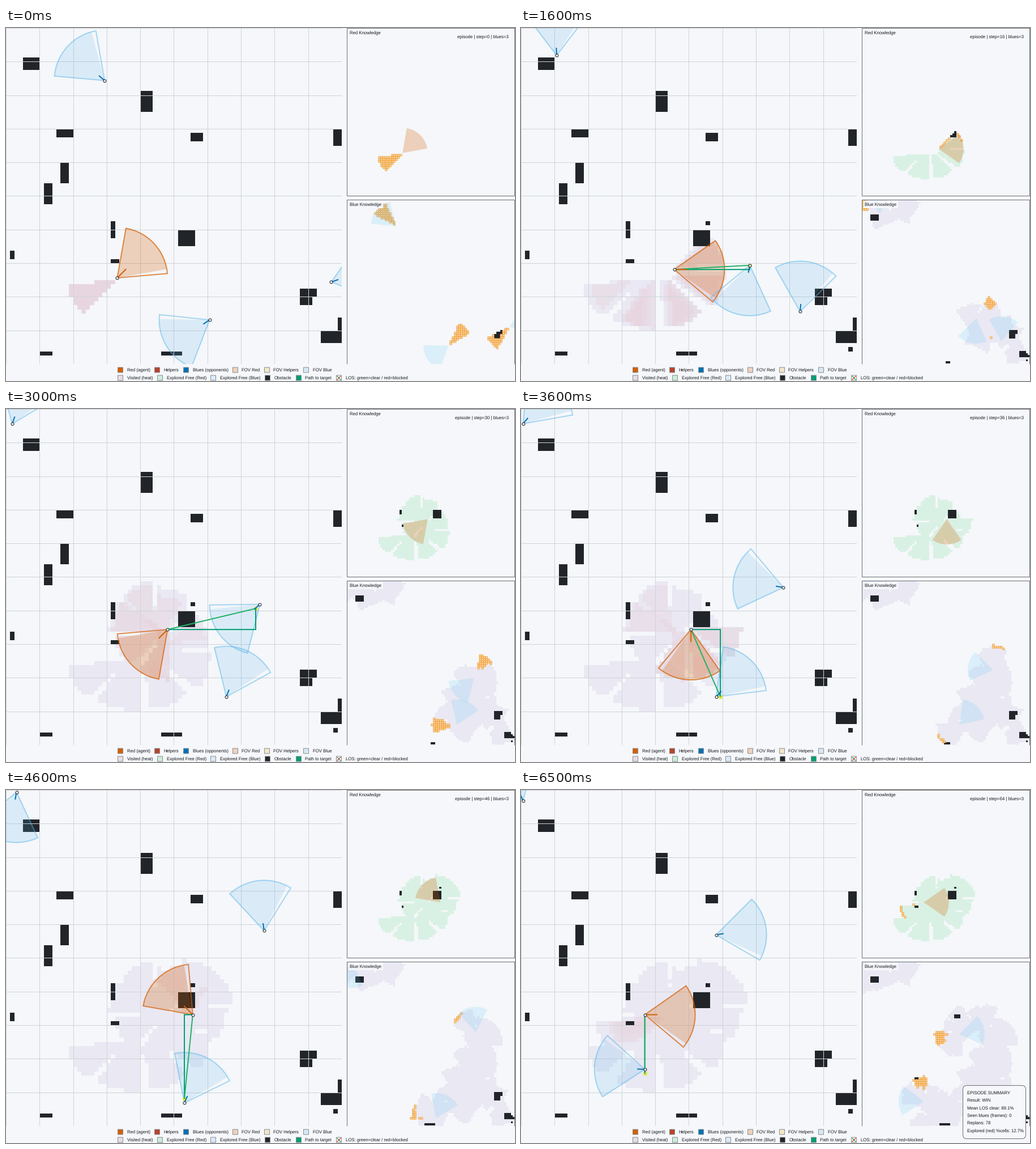
These frames come from a looping animation (899 by 623 pixels, 6600 ms). A matplotlib script:

```python
import numpy as np
import matplotlib.pyplot as plt
from matplotlib.animation import FuncAnimation
from matplotlib.patches import FancyBboxPatch, Polygon, Rectangle

W, H, DPI = 899, 623, 64
PX = 72 / DPI
SIDE = 593
MINI = SIDE / 2
N, LAST, FRAMES = 80, 64, 66
REACH, HALF, SWAY = 12, 35, 60
BG, DARK, GRAY, ORANGE = "#f5f7fa", "#212529", "#6c6f75", "#f59a23"
RED, BLUE, SKY, AQUA = "#d55e00", "#0072b2", "#56b4e9", "#50c8f5"
PATH, SIGHT = "#009e73", "#22b266"
LAVENDER = np.array([233, 232, 243]) / 255
PINK = np.array([231, 214, 224]) / 255
GREEN = np.array([217, 241, 228]) / 255
INK = np.array([33, 37, 41]) / 255

plt.rcParams.update({"font.family": "Liberation Sans", "path.snap": False,
                     "font.size": 7.7 * PX, "text.hinting": "none"})

steps = np.arange(LAST + 1)
rows, cols = np.mgrid[:N, :N]

# column, row, width, height in cells; the last two appear after the first step
BLOCKS = [(4, 7, 4, 3), (32, 15, 3, 5), (12, 24, 4, 2), (44, 25, 3, 2),
          (78, 24, 2, 4), (13, 32, 2, 5), (9, 37, 2, 5), (25, 46, 1, 4),
          (41, 48, 4, 4), (1, 53, 1, 2), (25, 55, 2, 1), (70, 62, 4, 2),
          (70, 64, 3, 2), (79, 69, 1, 3), (75, 72, 5, 3), (8, 77, 3, 1),
          (37, 77, 5, 1), (44, 46, 1, 1), (78, 76, 1, 1)]


def fill_blocks(blocks):
    mask = np.zeros((N, N), bool)
    for c, r, w, h in blocks:
        mask[r:r + h, c:c + w] = True
    return mask


solid, solid_first = fill_blocks(BLOCKS), fill_blocks(BLOCKS[:-2])


def snap(angle):
    return np.rint(angle / 45) * 45


def make_unit(times, keys):
    """Glide between (column, row, heading) keys."""
    c, r, look = [np.interp(steps, times, v) for v in zip(*keys)]
    return dict(pos=np.rint(np.stack([c, r], 1)), look=look)


def scan_ahead(times, keys):
    """Travel direction of each leg, swaying once from side to side."""
    xy = np.array(keys)[:, :2]
    dx, dy = np.diff(xy, axis=0).T
    heading = np.degrees(np.arctan2(dy, dx))
    leg = np.clip(np.searchsorted(times, steps, "right") - 1, 0, len(dx) - 1)
    t = np.array(times)
    u = (steps - t[leg]) / (t[leg + 1] - t[leg])
    return heading[leg] + SWAY * np.sin(2 * np.pi * u)


def make_blue(*keys):
    times = [0, 9, 23, 36, 46, 55, 64]
    return dict(make_unit(times, keys), scan=scan_ahead(times, keys))


red = make_unit([0, 13, 23, 36, 46, 55, 64],
                [(26, 59, -45), (36, 59, 60), (36, 52, -135), (40, 52, -270),
                 (44, 53, -495), (37, 53, -405), (29, 53, -360)])
red["look"] = snap(red["look"])
u = np.minimum(steps / 55, 1)
red["scan"] = snap(135 - 360 * (u + u * u * (3 - 2 * u)))

blues = [
    make_blue((23, 12, 220), (14, 7, 270), (2, 4, 265), (0, 3, 310),
              (2, 0, 460), (0, 3, 580), (0, 2, 605)),
    make_blue((48, 69, 146), (52, 60, 121), (57, 51, 80), (62, 42, 190),
              (61, 33, 262), (54, 30, 190), (46, 34, 350)),
    make_blue((77, 60, 340), (73, 67, 285), (59, 67, 266), (46, 68, 313),
              (42, 74, 294), (33, 74, 314), (29, 66, 182))]
units = [red] + blues


def fan(unit, s, start, width):
    """Cells within reach, clockwise from a start angle."""
    c, r = unit["pos"][s]
    dx, dy = cols - c, rows - r
    dist = np.hypot(dx, dy)
    turn = (np.degrees(np.arctan2(dy, dx)) - start + 1e-6) % 360
    return (dist > 0) & (dist <= REACH) & (turn <= width + 1e-3)


def rgba(mask, color, blocks):
    img = np.zeros((N, N, 4))
    img[..., :3] = color
    img[..., 3] = mask | blocks
    img[blocks, :3] = INK
    return img


def heat_image(heat, blocks):
    share = heat / heat.max()
    mix = ((share > 0.4) * share)[..., None]
    return rgba(heat > 0.045, LAVENDER * (1 - mix) + PINK * mix, blocks)


def explore(team, color):
    """Known-map image and newly found cells for every step."""
    seen = np.zeros((N, N), bool)
    walls = np.zeros((N, N), bool)
    out = []
    for s in steps:
        before = seen
        for m in team:
            seen = seen | fan(m, s, m["scan"][s], HALF)
            if s:
                view = fan(m, s - 1, m["look"][s - 1] - HALF, 2 * HALF)
                walls = walls | view & solid
        r, c = np.nonzero(seen & ~before & ~solid)
        out.append((rgba(seen, color, solid & (walls | seen)),
                    np.stack([c, r], 1) + 0.5))
    return out


def visits():
    heat = np.zeros((N, N))
    out = []
    for s in steps:
        heat = heat * 0.95 + fan(red, s, red["scan"][s], HALF)
        out.append(heat_image(heat, solid if s else solid_first))
    return out


heat_maps = visits()
red_maps, blue_maps = explore([red], GREEN), explore(blues, LAVENDER)

fig = plt.figure(figsize=(W / DPI, H / DPI), dpi=DPI, facecolor=BG)


def pane(x, y, w, h, xmax, ymax):
    ax = fig.add_axes([x / W, 1 - (y + h) / H, w / W, h / H])
    ax.set(xlim=(0, xmax), ylim=(ymax, 0))
    ax.axis("off")
    return ax


def layer(ax):
    lims = ax.get_xlim(), ax.get_ylim()
    img = ax.imshow(np.zeros((N, N, 4)), extent=(0, N, N, 0), aspect="auto",
                    interpolation="nearest", zorder=1)
    ax.set(xlim=lims[0], ylim=lims[1])
    return img


def sector(unit, s, extra=0):
    c, r = unit["pos"][s] + 0.5
    a = np.radians(unit["look"][s] + np.arange(-HALF, HALF + extra + 1, 5))
    return np.stack([np.r_[c, c + REACH * np.cos(a)],
                     np.r_[r, r + REACH * np.sin(a)]], 1)


def wedge(ax, color, alpha, line=False):
    style = (dict(fc="none", ec=color, lw=2 * PX) if line
             else dict(fc=color, ec="none"))
    return ax.add_patch(Polygon([(0, 0)] * 3, closed=True, alpha=alpha,
                                zorder=4, **style))


def stroke(ax, color, width, z):
    return ax.plot([], [], color=color, lw=width * PX, zorder=z,
                   solid_capstyle="butt", solid_joinstyle="miter")[0]


def boxes(ax):
    return ax.scatter([], [], s=(3 * PX) ** 2, marker="s", fc="#fdf6ea",
                      ec=ORANGE, lw=PX, zorder=3, snap=True)


field = pane(0, 0, SIDE, SIDE, N, N)
map_r = pane(602, 0, MINI, MINI, N, N)
map_b = pane(602, 303, MINI, 291, N, N * 291 / MINI)
top = pane(0, 0, W, H, W, H)

heat_img, red_img, blue_img = layer(field), layer(map_r), layer(map_b)
cell = SIDE / N
for k in range(0, N, 8):
    at = (np.rint(k * cell) + 0.5) / cell
    for line in (([at, at], [0, N]), ([0, N], [at, at])):
        field.plot(*line, color="#d0d3d6", lw=PX, zorder=3)

for unit in units:
    mine = unit is red
    tone, edge, mini = (RED, RED, RED) if mine else (BLUE, SKY, AQUA)
    unit["fill"] = wedge(field, edge, 0.25 if mine else 0.17)
    unit["rim"] = wedge(field, edge, 0.7 if mine else 0.5, line=True)
    unit["mini"] = wedge(map_r if mine else map_b, mini, 0.25 if mine else 0.16)
    unit["arrow"] = stroke(field, tone, 2, 7)
    unit["reach"] = 3 if mine else 1.8
    unit["dot"] = field.plot([], [], "o", ms=5 * PX, mfc="#e9eef2", mec=DARK,
                             mew=PX, zorder=8)[0]
new_r, new_b = boxes(map_r), boxes(map_b)
goal = field.plot([], [], "s", ms=6 * PX, mfc="#dfe61e", mec="none", zorder=5)[0]
path, sight = stroke(field, PATH, 2, 5), stroke(field, SIGHT, 2, 6)


def label(x, y, text, **kw):
    return top.text(x, y, text, color="#15181b", va="center_baseline",
                    zorder=6, **kw)


def box(x, y, w, h, z=3, fill=BG, edge="none"):
    return top.add_patch(Rectangle((x, y), w, h, fc=fill, ec=edge, lw=PX,
                                   zorder=z, joinstyle="miter"))


box(594, 594, 305, 29)
for y, name in ((0, "Red Knowledge"), (303, "Blue Knowledge")):
    box(602.5, y + 0.5, 296, 296 if y == 0 else 290, 2, "none", GRAY)
    box(605, y + 2, 61, 13)
    label(607, y + 8, name)
top.plot([603, 898], [593.5, 593.5], color=BG, lw=PX, zorder=3)
status = label(888, 15, "", ha="right")

LEGEND = [
    [("Red (agent)", RED), ("Helpers", "#b8432a"), ("Blues (opponents)", BLUE),
     ("FOV Red", "#eed1bc"), ("FOV Helpers", "#f3e6c8"), ("FOV Blue", "#d6e9f4")],
    [("Visited (heat)", "#e8dce4"), ("Explored Free (Red)", "#cbeed8"),
     ("Explored Free (Blue)", "#d9eafa"), ("Obstacle", DARK),
     ("Path to target", PATH), ("LOS: green=clear / red=blocked", "#ffffff")]]
pen = fig.canvas.get_renderer()
for i, entries in enumerate(LEGEND):
    x, y = 197, 603.5 + 14 * i
    for name, color in entries:
        box(x + 0.5, y - 4.5, 9, 9, 5, color, "#8a8d91")
        text = label(x + 16.5, y, name)
        swatch = x
        x = round(x + 16.5 + text.get_window_extent(pen).width + 7.5)
for way, color in ((1, "#18a558"), (-1, "#d63a2f")):
    top.plot([swatch + 2, swatch + 8], [y - 3 * way, y + 3 * way],
             color=color, lw=1.3 * PX, zorder=6)

SUMMARY = ["EPISODE SUMMARY", "Result: WIN", "Mean LOS clear: 89.1%",
           "Seen blues (frames): 0", "Replans: 78",
           "Explored (red) %cells: 12.7%"]
card = [top.add_patch(FancyBboxPatch(
    (780.5, 521.5), 111, 94, fc=BG, ec=GRAY, lw=PX, zorder=5,
    boxstyle="round,pad=0,rounding_size=7"))]
card += [label(788.5, 534 + 13.4 * i, t) for i, t in enumerate(SUMMARY)]


def chase(s):
    """Route and sight line from red to the nearest blue's last cell."""
    here = red["pos"][s]
    near = min(blues, key=lambda b: np.abs(b["pos"][s] - here).sum())
    (c, r), (tc, tr) = here + 0.5, near["pos"][s - 1] + 0.5
    path.set_data([c, tc, tc], [r, r, tr])
    sight.set_data([c, tc], [r, tr])
    goal.set_data([tc], [tr])


def draw(f):
    s = min(f, LAST)
    heat_img.set_data(heat_maps[s])
    for img, dots, (known, fresh) in ((red_img, new_r, red_maps[s]),
                                      (blue_img, new_b, blue_maps[s])):
        img.set_data(known)
        dots.set_offsets(fresh)
    for unit in units:
        shape = sector(unit, s)
        unit["fill"].set_xy(shape)
        unit["mini"].set_xy(shape)
        unit["rim"].set_xy(sector(unit, s, 5))
        c, r = unit["pos"][s] + 0.5
        a = np.radians(unit["look"][s])
        unit["arrow"].set_data([c, c + unit["reach"] * np.cos(a)],
                               [r, r + unit["reach"] * np.sin(a)])
        unit["dot"].set_data([c], [r])
    if s:
        chase(s)
    for art in (path, sight, goal):
        art.set_visible(s > 0)
    for art in card:
        art.set_visible(f > LAST)
    status.set_text(f"episode | step={s} | blues=3")
    return []


anim = FuncAnimation(fig, draw, frames=FRAMES, interval=100, repeat=True,
                     repeat_delay=0, blit=False)
plt.show()
```
